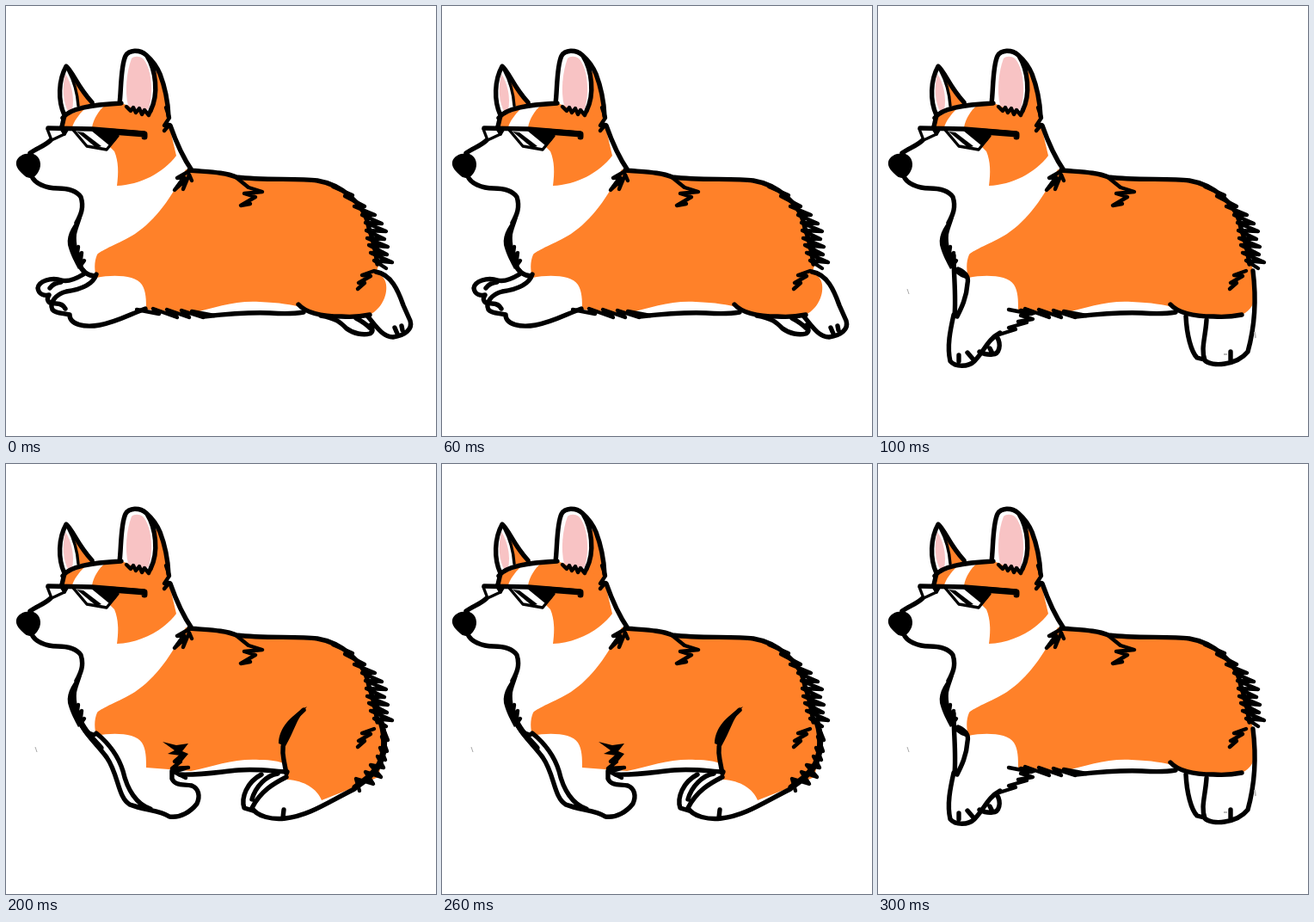
Recreate the animation shown at these times as an HTML page. Size 500 px wide and 500 px high, loop 0.4 s.

```html
<!DOCTYPE html>
<html lang="en">
<head>
<meta charset="utf-8">
<title>Running corgi</title>
<style>
  html, body { margin: 0; width: 100%; height: 100%; overflow: hidden; background: #fff; }
  svg { display: block; width: 100vw; height: 100vh; }
  .line { fill: none; stroke: #000; stroke-width: 5.4; stroke-linecap: round; stroke-linejoin: round; }
  .thin { stroke-width: 3.4; }
  .fur { stroke-width: 4.4; }
  .bold { stroke-width: 7; }
  .coat { fill: #ff8129; }
  .pink { fill: #f8c3c4; }
  .white { fill: #fff; }
  .ink { fill: #000; }
</style>
</head>
<body>
<svg id="stage" viewBox="0 0 500 500" xmlns="http://www.w3.org/2000/svg"></svg>
<script>
const stage = document.getElementById('stage');
const STEP = 100;
const ORDER = ['stretch', 'stand', 'tuck', 'stand'];

const path = (cls, d) => `<path class="${cls}" d="${d}"/>`;
const line = (...ds) => path('line', ds.join(''));
const fur = (...ds) => path('line fur', ds.join(''));
const thin = (...ds) => path('line thin', ds.join(''));
const bold = (...ds) => path('line bold', ds.join(''));
const group = (id, ...parts) => `<g id="${id}">${parts.join('')}</g>`;

// Coat outline from the neck down the chest; each pose supplies the underside.
const coat = underside => path('coat',
  'M209 190C193 222 174 249 150 265C130 277 112 283 106 289C102 298 103 308 105 316' +
  'C125 312 151 313 158 324C163 332 163 342 163 353L215 357' +
  'C243 351 267 342 295 344' + underside +
  'L434 300L419 244C400 222 382 207 361 205C330 202 290 202 266 199C246 194 230 193 213 191Z');

const bellyFur = fur('M152 353L178 358L171 352L199 362L187 353L213 362L204 354L229 362L216 355L242 360');
const bellyLine = line('M230 361C258 358 284 356 307 357C322 358 335 358 346 356');
const flank = line('M340 347C350 358 372 361 390 361C402 362 413 361 423 359');
const specks = '<path d="M34 329L36 335" stroke="#aaa" stroke-width="1" fill="none"/>';

const poses = {
  stretch: [
    coat('C318 345 332 347 345 351C362 361 400 361 421 360C435 354 444 338 442 324C441 317 437 313 430 310'),
    bellyFur, bellyLine, flank,
    line('M85 300C88 308 94 313 103 314',
         'M105 312C101 325 84 330 70 332C58 335 50 345 54 353C58 358 67 357 74 359',
         'M74 359C74 371 92 374 109 371C130 367 145 358 162 352',
         'M58 346C64 346 67 348 69 352',
         'M90 312C80 318 72 321 65 319C52 315 38 320 37 328C38 336 45 337 50 336',
         'M64 321C57 322 53 325 51 328M50 336C46 342 50 346 55 346'),
    line('M430 309C448 312 456 331 462 348L470 366C473 376 464 383 450 385C438 385 430 372 420 360',
         'M452 374L455 381M460 372L461 377',
         'M366 360C384 363 389 368 396 375C404 381 415 383 423 381C427 379 427 375 424 371M407 363C413 366 420 371 425 376')
  ],
  stand: [
    coat('C318 345 332 347 345 351C362 361 400 363 421 360C430 356 436 350 437 342L437 310'),
    bellyFur, bellyLine, flank,
    fur('M166 354L181 357L166 360L180 364L163 367L173 368L152 374L160 376L141 382'),
    line('M88 290C88 314 91 338 89 360',
         'M93 306C102 310 106 315 104 323C103 339 97 351 92 361',
         'M88 359C84 377 80 396 84 413C90 420 105 420 112 413C124 401 127 388 142 380',
         'M94 406L94 413M104 403L110 410',
         'M138 384C144 394 141 405 133 405C127 406 122 404 118 402M130 398L133 404'),
    line('M436 308C440 340 438 373 430 402C417 418 388 420 380 412C375 399 381 384 382 365',
         'M358 361C359 382 364 402 371 409L379 411M410 402L410 412'),
    '<path d="M438 379L439 386M402 405L406 405" stroke="#bbb" stroke-width="2" fill="none"/>',
    specks
  ],
  tuck: [
    coat('C309 344 317 346 323 348L327 367C347 368 362 378 367 391L405 376L433 364L440 330'),
    line('M83 292C88 310 104 324 117 341C131 361 130 388 144 396L158 400',
         'M105 313C121 326 131 341 136 357C141 379 152 396 168 401',
         'M144 396C160 403 178 402 190 410C203 412 215 404 222 395C226 386 224 377 216 374C207 372 197 375 193 366L193 357'),
    bold('M84 294C89 308 100 319 110 330'),
    path('ink', 'M182 323L198 327L212 325L205 334L212 337L201 350L203 339L188 337L196 333Z'),
    fur('M205 338L196 346L203 346L193 354L212 353L195 358L209 365'),
    line('M202 361C226 362 248 358 270 356C291 354 309 357 327 358'),
    line('M346 286C331 299 318 321 323 344L326 360',
         'M326 364C312 371 296 380 286 400C292 410 310 414 325 412C352 409 373 394 405 378',
         'M297 361C280 370 273 388 277 400L287 403M316 360C303 362 290 375 286 390M323 402L322 411'),
    path('ink', 'M350 282C337 298 335 311 325 328L317 325C317 308 330 293 350 282Z'),
    bold('M436 300C442 318 441 340 431 354C424 363 415 370 406 376'),
    fur('M438 306L444 321L437 317L443 334L435 330L441 344L432 340L439 353',
        'L424 350L436 364L418 358L427 372L407 366L411 380'),
    specks
  ]
};

const head = [
  path('coat', 'M69 128L92 119C84 127 79 134 77 141L67 141Z'),
  path('coat', 'M100 141C102 131 108 121 115 116L134 113L172 126L186 120L190 140L198 174' +
    'C183 194 156 208 129 209C131 194 131 181 126 169L117 160Z'),
  path('coat', 'M76 80C85 92 92 104 99 114L84 117C84 104 80 92 76 80Z'),
  path('pink', 'M69 79C65 94 66 112 73 124L77 121C80 106 76 89 69 79Z'),
  path('coat', 'M167 68L178 80C185 97 188 113 188 130L168 126C176 111 174 91 167 68Z'),
  path('pink', 'M146 61C140 77 138 99 142 116C151 121 161 125 166 119C172 100 169 71 159 61C155 58 149 58 146 61Z'),
  line('M68 127C60 110 61 86 70 70C78 77 83 94 100 112',
       'M132 113C134 101 133 70 139 58C143 51 155 50 163 57C171 64 176 72 179 79C184 92 188 106 189 128',
       'M164 58C174 74 178 102 168 122',
       'M66 130C74 119 99 115 134 113M68 128C66 134 66 138 64 143'),
  thin('M72 74C79 87 83 101 84 116'),
  fur('M140 117L145 122L148 118L151 124L155 119L158 126L161 121L166 127L169 120',
      'M186 118L190 130L184 139L190 138L184 145'),
  line('M52 156C46 162 37 165 28 171',
       'M30 198C33 206 46 212 60 212C72 212 82 215 87 222C91 234 87 243 82 252'),
  path('ink', 'M12 181C14 173 24 170 32 172C40 175 42 185 38 192C33 202 25 202 19 195C15 191 11 187 12 181Z')
].join('');

const glasses = [
  path('white', 'M48 143L54 156L69 149L78 144L93 163L118 167L130 152L126 144Z'),
  thin('M48 143L53 156L68 149L66 144', 'M78 144L94 163L117 167L130 151'),
  path('ink', 'M62 143L73 144L69 151L66 149Z'),
  path('ink', 'M82 146L90 147L111 163L105 165Z'),
  path('ink', 'M98 144L132 145L128 156L120 162Z'),
  line('M49 142L100 143L160 148'),
  bold('M122 146L161 149L161 152')
].join('');

const back = [
  line('M191 139C198 159 207 178 216 191',
       'M213 191C235 193 254 193 268 199C300 203 338 200 362 203C380 206 392 214 400 221'),
  fur('M213 192L199 200L207 199L196 214L209 202L206 213L213 196L216 203',
      'M266 198L282 211L298 216L277 218L290 222L273 232L284 230'),
  line('M398 220C414 232 420 246 422 258C427 272 430 286 432 300'),
  fur('M380 210L403 220L394 221L417 233L405 233L429 243L414 243L437 253L418 252L442 262',
      'L419 261L440 271L420 270L444 280L422 278L443 289L424 287L449 298L428 296L442 305',
      'M428 308L414 313L424 314L410 322L417 322L409 329')
].join('');

const chest = path('ink', 'M89 240C79 254 70 264 72 278C75 290 80 298 84 306L89 302C84 288 81 276 82 266C84 256 88 250 89 240Z') +
  fur('M84 280L82 294L88 287L86 303L91 296M86 300C89 308 95 313 103 315');

stage.innerHTML =
  Object.entries(poses).map(([name, parts]) => group(name, ...parts)).join('') +
  group('still', head, glasses, back, chest);

const layers = Object.keys(poses).map(id => document.getElementById(id));

function draw(now) {
  const pose = ORDER[Math.floor(now / STEP) % ORDER.length];
  for (const layer of layers) layer.style.display = layer.id === pose ? '' : 'none';
}

let start;
function tick(now) {
  start ??= now;
  draw(now - start);
  requestAnimationFrame(tick);
}
draw(0);
requestAnimationFrame(tick);
</script>
</body>
</html>
```
